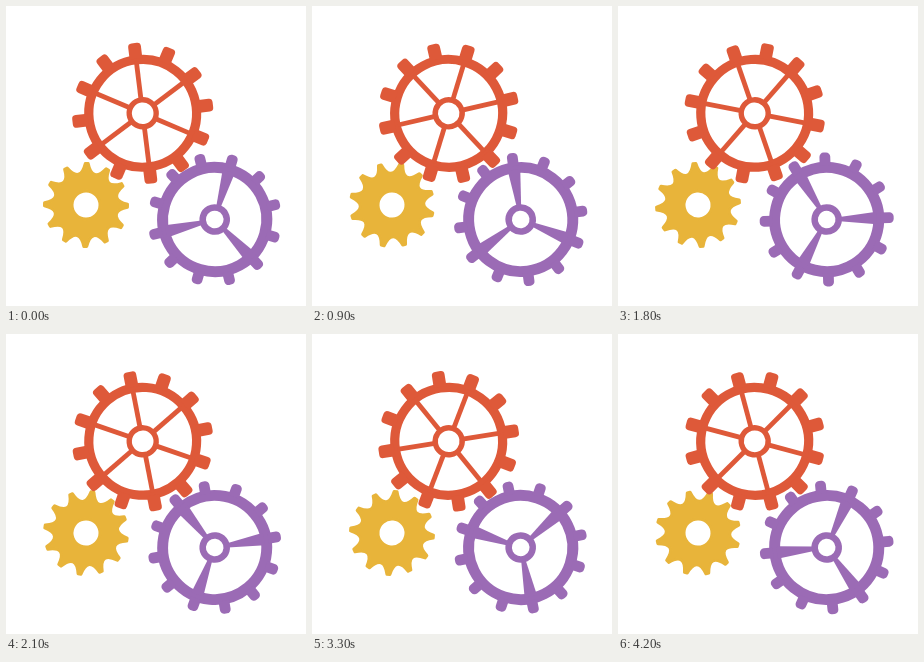
Recreate the animation shown at these times as an HTML page with a canvas. Size 300 by 300 pixels, loop 4500 ms.

```html
<!DOCTYPE html>
<html lang="en">
<head>
<meta charset="utf-8">
<title>Gears</title>
<style>
  html, body { margin: 0; width: 100%; height: 100%; overflow: hidden; background: #fff; }
  canvas { display: block; width: 300px; height: 300px; }
</style>
</head>
<body>
<canvas id="stage" width="300" height="300"></canvas>
<script>
const ctx = document.getElementById('stage').getContext('2d');
const STEP_MS = 300;
const STEPS = 15;
const TAU = Math.PI * 2;
const rad = deg => deg * Math.PI / 180;

function ring(inner, outer) {
  ctx.lineWidth = outer - inner;
  ctx.beginPath();
  ctx.arc(0, 0, (inner + outer) / 2, 0, TAU);
  ctx.stroke();
}

// Calls draw once per arm, with "up" pointing along that arm.
function around(count, draw) {
  for (let i = 0; i < count; i++) {
    ctx.save();
    ctx.rotate(i * TAU / count);
    draw();
    ctx.restore();
  }
}

function tooth(width, base, tip, radius) {
  ctx.beginPath();
  ctx.roundRect(-width / 2, -tip, width, tip - base, [radius, radius, 0, 0]);
  ctx.fill();
}

function spoke(hub, rim, hubWidth, rimWidth) {
  ctx.beginPath();
  ctx.moveTo(-hubWidth / 2, -hub);
  ctx.lineTo(-rimWidth / 2, -rim);
  ctx.lineTo(rimWidth / 2, -rim);
  ctx.lineTo(hubWidth / 2, -hub);
  ctx.fill();
}

function redGear() {
  ring(49.3, 58.5);
  ring(10.8, 16.2);
  around(12, () => tooth(12.8, 55, 70.7, 3.8));
  around(6, () => spoke(14, 52, 4.8, 4.8));
}

function purpleGear() {
  ring(46.6, 57.5);
  ring(8.8, 15.3);
  around(12, () => tooth(10.8, 54, 67, 4.2));
  around(3, () => spoke(13, 50, 4.4, 12.6));
}

function yellowGear() {
  const teeth = 12, tip = 41.5, valley = 23, half = rad(2);
  const at = (r, a) => [r * Math.sin(a), -r * Math.cos(a)];
  ctx.beginPath();
  for (let i = 0; i < teeth; i++) {
    const a = i * TAU / teeth, next = a + TAU / teeth;
    ctx.lineTo(...at(tip, a - half));
    ctx.lineTo(...at(tip, a + half));
    ctx.quadraticCurveTo(...at(valley, (a + next) / 2), ...at(tip, next - half));
  }
  ctx.closePath();
  ctx.moveTo(14, 0);
  ctx.arc(0, 0, 14, 0, TAU);
  ctx.fill('evenodd');
  ctx.lineWidth = 3;
  ctx.lineJoin = 'round';
  ctx.stroke();
}

const gears = [
  { x: 80, y: 199, color: '#e8b43a', start: 1, turn: -16, draw: yellowGear },
  { x: 136.7, y: 107.3, color: '#de5939', start: -7, turn: 8, draw: redGear },
  { x: 208.7, y: 213.5, color: '#9b6bb5', start: 16.3, turn: -8, draw: purpleGear }
];

function render(now) {
  const step = Math.floor(now / STEP_MS) % STEPS;
  ctx.fillStyle = '#fff';
  ctx.fillRect(0, 0, 300, 300);
  for (const gear of gears) {
    ctx.save();
    ctx.translate(gear.x, gear.y);
    ctx.rotate(rad(gear.start + gear.turn * step));
    ctx.fillStyle = ctx.strokeStyle = gear.color;
    gear.draw();
    ctx.restore();
  }
}

let begin;
function tick(now) {
  begin ??= now;
  render(now - begin);
  requestAnimationFrame(tick);
}
render(0);
requestAnimationFrame(tick);
</script>
</body>
</html>
```
